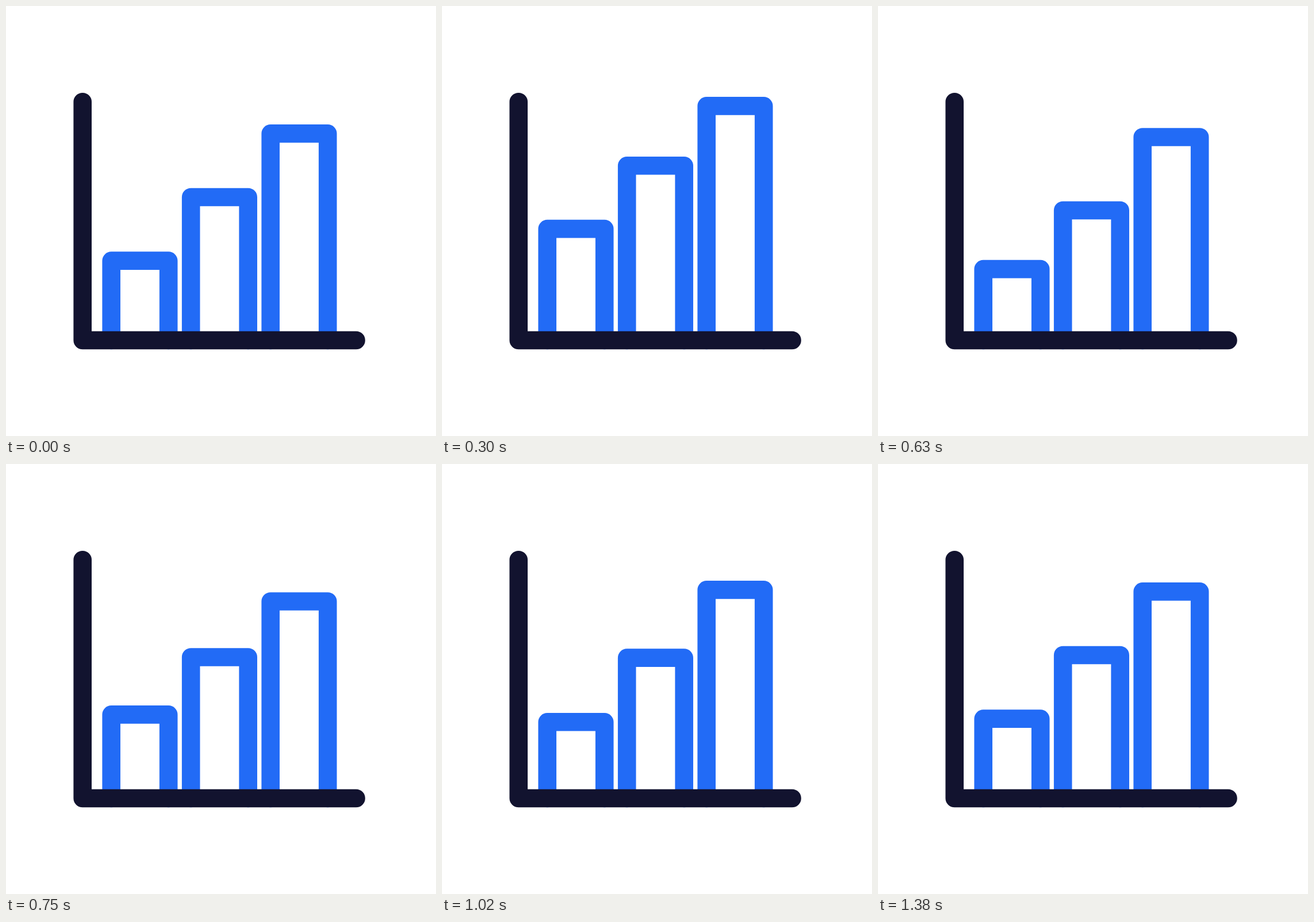
Write an HTML page that moves like this. It is 748x748 px and loops after 1940 ms.

```html
<!DOCTYPE html>
<html lang="en">
<head>
<meta charset="utf-8">
<title>Bar chart</title>
<style>
  html, body { margin: 0; width: 100%; height: 100%; overflow: hidden; background: #fff; }
  svg { display: block; width: 100%; height: 100%; }
  path { fill: none; stroke-width: 31.6; stroke-linecap: round; stroke-linejoin: round; }
  .bar { stroke: #226bf6; }
  .axis { stroke: #12132f; }
</style>
</head>
<body>
<svg viewBox="0 0 748 748">
  <path class="bar"/>
  <path class="bar"/>
  <path class="bar"/>
  <path class="axis" d="M133.2 166.7V581.5H609"/>
</svg>
<script>
const LOOP = 1940, STEP = 30, DELAY = 66.7;
const bars = [...document.querySelectorAll('.bar')];

// Higher a: slower start. Higher b: softer landing.
const ease = (u, a = 1.6, b = 2.6) => 1 - (1 - u ** a) ** b;

// Turning points of the bounce: time in ms, lift in px, easing towards it
const poses = [
  { at: 310, lift: 55.5, curve: [1.5, 4] },
  { at: 568, lift: -23, curve: [3.4, 3.8] },
  { at: 820, lift: 10.4 },
  { at: 1000, lift: -6 },
  { at: 1245, lift: 0 }
];

function liftAt(t) {
  let from = { at: 0, lift: 0 };
  for (const to of poses) {
    if (t < to.at) {
      const u = Math.max(0, (t - from.at) / (to.at - from.at));
      return from.lift + (to.lift - from.lift) * ease(u, ...(to.curve || []));
    }
    from = to;
  }
  return from.lift;
}

function draw(now) {
  const t = Math.floor((now % LOOP) / STEP) * STEP;
  bars.forEach((bar, i) => {
    const x = 183.2 + 138.5 * i;
    const top = 443.1 - 110.6 * i - liftAt(t - DELAY * i);
    bar.setAttribute('d', `M${x} 581.5V${top}h99.5V581.5`);
  });
}

const start = performance.now();
function tick() {
  draw(performance.now() - start);
  requestAnimationFrame(tick);
}
tick();
</script>
</body>
</html>
```
